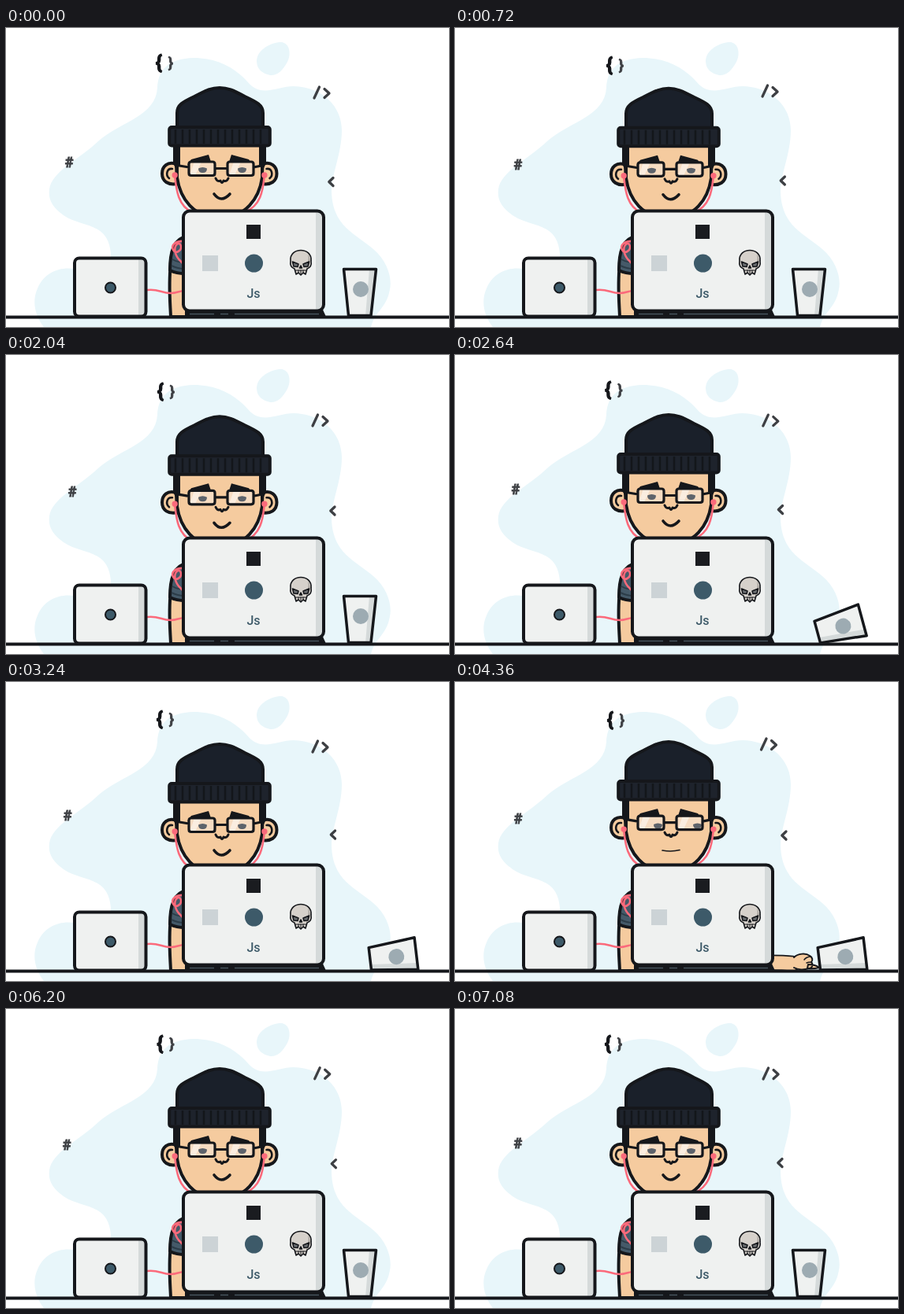
These frames come from a looping animation (562 by 380 pixels, 7120 ms). An HTML page:

```html
<!DOCTYPE html>
<html lang="en">
<head>
<meta charset="utf-8">
<title>Coder at the desk</title>
<style>
  html, body { margin: 0; width: 100%; height: 100%; overflow: hidden; background: #fff; }
  svg { display: block; width: 562px; height: 380px; }
  .ink { stroke: #15171b; stroke-width: 4; stroke-linejoin: round; stroke-linecap: round; }
  .line { fill: none; }
  .skin { fill: #f5cb9f; }
  .shell { fill: #eff1f0; }
  .shade { fill: #d5dada; }
  .cord { fill: none; stroke: #fb6a7b; stroke-width: 2.6; stroke-linecap: round; }
  .code { font: 700 22px Roboto, Arial, sans-serif; text-anchor: middle; fill: #3d3f43; stroke: #3d3f43; stroke-width: .8; }
  .code path { fill: none; stroke-width: 3.3; stroke-linecap: round; stroke-linejoin: round; }
  #fist path { vector-effect: non-scaling-stroke; }
</style>
</head>
<body>
<svg viewBox="0 0 562 380">
  <g fill="#e8f6fa">
    <path d="M55 205C58 182 92 168 118 143C146 119 190 112 192 76C193 52 207 39 238 38C270 38 292 52 307 69C324 89 344 74 365 74C402 75 426 100 426 130C426 160 413 185 413 208C414 252 444 262 466 281C484 296 490 318 487 332C483 356 468 360 463 380H48C36 365 33 346 40 331C50 306 78 300 100 310C120 318 134 302 133 287C130 246 96 254 73 238C61 229 53 220 55 205Z"/>
    <path d="M318 42C318 28 336 18 349 18C360 19 362 33 357 43C351 54 344 61 335 60C326 58 318 53 318 42Z"/>
  </g>

  <g class="code">
    <g id="braces">
      <text dy="7" style="font-size:24px;fill:#15171b;stroke:#15171b;stroke-width:1.3">{</text>
      <text x="15" dy="6.3" style="font-size:19px">}</text>
    </g>
    <path id="tag" d="M-9 7L-2.500 -7M4 -4.500L10 1L4 6.500"/>
    <text id="hash" dy="6.400" style="font-size:18px">#</text>
    <path id="less" d="M2.500 -5L-2.700 0L2.500 5"/>
  </g>

  <!-- near arm and sleeve -->
  <path class="ink skin" d="M209 300C206 325 208 345 209 367H240V300Z"/>
  <path class="ink" fill="#455a69" d="M208 308C208 285 212 267 232 264V312Q218 313 208 308Z"/>
  <path class="line" stroke="#2c3c48" stroke-width="2" d="M210 302Q218 306 226 306M211 294Q218 298 226 298"/>
  <path class="cord" d="M227 271C215 270 209 276 212 282C215 288 223 283 222 277C220 270 212 276 215 286C218 297 224 295 227 304"/>

  <g id="head">
    <g id="ear">
      <path class="ink skin" d="M216 173C205 169 198 176 198 185C198 195 206 200 217 198Z"/>
      <path class="ink line" style="stroke-width:2.6" d="M211 179C204 178 202 187 207 191"/>
    </g>
    <use href="#ear" transform="matrix(-1 0 0 1 541.5 0)"/>
    <path class="ink skin" d="M217 145V190C221 217 238 241 271 241C304 241 321 217 325 190V145Z"/>
    <path fill="#15171b" d="M212 148H221V174L216 180L212 172ZM330 148H321V174L326 180L330 172Z"/>
    <path class="cord" d="M214 187C216 203 217 225 236 234M328 187C326 203 325 225 303 234"/>
    <path fill="#fb6a7b" d="M210.500 187a3.700 3.700 0 1 1 7.400 0a3.700 3.700 0 1 1 -7.400 0M324.200 187a3.700 3.700 0 1 1 7.400 0a3.700 3.700 0 1 1 -7.400 0"/>
    <path fill="#15171b" d="M230 174L235 167L257 161L260 170ZM313 174L308 167L286 161L283 170Z"/>
    <g fill="#f6dcc2"><rect x="232" y="170" width="33" height="17.500" rx="3"/><rect x="281" y="170" width="33" height="17.500" rx="3"/></g>
    <g id="eyes" fill="#5d636b">
      <path d="M244 178.500Q249.500 175.500 255 178.500Q255 184 249.500 184Q244 184 244 178.500ZM294 178.500Q299.500 175.500 305 178.500Q305 184 299.500 184Q294 184 294 178.500Z"/>
    </g>
    <path fill="#fff" opacity=".5" d="M239 170h9l-8 17h-7zM289 170h9l-8 17h-7z"/>
    <path class="ink line" style="stroke-width:3.200" d="M235 170H262Q265 170 265 173V184.500Q265 187.500 262 187.500H235Q232 187.500 232 184.500V173Q232 170 235 170ZM284 170H311Q314 170 314 173V184.500Q314 187.500 311 187.500H284Q281 187.500 281 184.500V173Q281 170 284 170ZM265 178.500H281M232 177L220 175M314 177L324 175"/>
    <path class="ink line" style="stroke-width:3" d="M266 191Q268 196 272 194Q274 199 276 194Q280 196 282 191"/>
    <path id="mouth" class="ink line"/>
    <path class="ink" fill="#1a202a" d="M217 128V108C217 98 224 94 239 87C254 79 261 76 271 76C281 76 288 79 303 87C318 94 326 98 326 108V128Z"/>
    <rect class="ink" x="207.200" y="126" width="127.600" height="23.500" rx="3" fill="#1e232c"/>
    <path id="ribs" class="line" stroke="#13161a" stroke-width="2.500"/>
  </g>

  <g id="arm">
    <path id="sleeve" class="ink line"/>
    <path id="forearm" class="line" stroke="#f5cb9f" stroke-width="17" stroke-linecap="round"/>
    <g id="fist">
      <path class="ink skin" style="stroke-width:2" d="M6 3Q15 3 20 7Q12 9 5 8ZM-12 -6C-7 -11 3 -12 8 -8C12 -6 12 -2 10 0C13 3 11 8 7 8C1 10 -7 10 -12 7"/>
      <path class="ink line" style="stroke-width:1.500" d="M8 -7Q3 -6 1 -3M10 0Q6 0 4 1"/>
    </g>
  </g>

  <g id="cup">
    <path class="shell" d="M428 306H470L463 366H434Z"/>
    <path class="shade" d="M461 306H470L463 366H456Z"/>
    <circle cx="450" cy="332" r="10" fill="#9dabb2"/>
    <path class="ink line" style="stroke-width:3.500" d="M428.500 306.500H469.500L463 365.500H434.500Z"/>
  </g>

  <!-- small laptop -->
  <path class="cord" d="M179 333C193 331 197 337 209 337C217 337 219 334 227 334"/>
  <rect class="shell" x="87" y="292.500" width="90.500" height="74" rx="6"/>
  <path class="shade" d="M168 294H176V365H168Z"/>
  <rect class="ink line" x="87" y="292.500" width="90.500" height="74" rx="6"/>
  <circle class="ink" cx="132.500" cy="330" r="6.500" fill="#3d5a69" style="stroke-width:2"/>

  <!-- large laptop -->
  <path fill="#15171b" d="M227 358H402L406 367H227Z"/>
  <path class="line" stroke="#46545d" stroke-width="1.500" d="M233 363.500H264M272 363.500H282M290 363.500H397"/>
  <rect class="shell" x="225" y="232.500" width="178" height="127" rx="8"/>
  <path class="shade" d="M393 234H398Q402 235 402 241V352Q402 358 398 358H393Z"/>
  <rect class="ink line" x="225" y="232.500" width="178" height="127" rx="8"/>
  <rect x="305" y="250" width="18" height="18" fill="#1a1c20"/>
  <rect x="249" y="289" width="20" height="20" fill="#ccd3d6"/>
  <circle cx="314.500" cy="299" r="11.500" fill="#3d5a69"/>
  <text x="314" y="342.500" text-anchor="middle" fill="#3d5a69" style="font:500 16px Roboto,Arial,sans-serif">Js</text>
  <g class="ink" fill="#d6d1cb" style="stroke-width:1.600">
    <path d="M361 296C359 278 389 278 387 296C388 302 385 305 382 306L380 313L377 311L374 314L371 311L368 313L366 306C363 305 360 302 361 296Z"/>
    <path fill="#aaa59f" stroke="none" d="M383 287Q388 295 384 303L380 306Q385 296 383 287Z"/>
    <path fill="#6a6d70" d="M363.500 297L371 300L370 303.500L365 303ZM384.500 297L377 300L378 303.500L383 303ZM374 302L372.500 305H375.500Z"/>
    <path class="line" d="M367 308H381M371 308V311M374 308V313M377 308V311" style="stroke-width:1"/>
  </g>

  <path stroke="#15171b" stroke-width="4" d="M0 367.500H562"/>
</svg>
<script>
const LOOP = 7120;
const el = id => document.getElementById(id);
const set = (id, name, value) => el(id).setAttribute(name, value);
const move = (id, x, y, more = '') => set(id, 'transform', `translate(${x} ${y}) ${more}`);
const mix = (a, b, k) => a + (b - a) * k;

// Drifting symbols: shared key times and one x and y track each.
const keys = [0, 760, 1440, 2040, 2800, 3240, 4360, 5320, 6480];
const drift = {
  braces: [[194, 196, 195, 196, 194, 195, 197, 197, 195], [45, 48, 51, 47, 45, 47.5, 49, 48, 44.5]],
  tag: [[400, 399, 398, 398, 400, 398, 397.5, 399, 401], [82, 80, 81, 83, 83, 82, 79, 84, 81]],
  hash: [[80, 80, 82.5, 84, 75.5, 78, 80, 85, 75.5], [171, 174, 175.5, 174, 170, 169.5, 174, 175, 172]],
  less: [[412.5, 416, 416, 414.5, 413, 415, 417.5, 414.5, 416], [195.5, 194, 197, 198, 196, 194, 195, 198.5, 196]]
};

// Smooth curve through the keys, closed over the loop.
function curve(track, t) {
  const n = keys.length;
  const time = i => keys[(i + n) % n] + Math.floor(i / n) * LOOP;
  const at = i => track[(i + n) % n];
  const slope = i => (at(i + 1) - at(i - 1)) / (time(i + 1) - time(i - 1));
  let i = n - 1;
  while (keys[i] > t) i--;
  const d = time(i + 1) - time(i), u = (t - time(i)) / d, v = 1 - u;
  return v * v * ((1 + 2 * u) * at(i) + u * d * slope(i))
    + u * u * ((3 - 2 * u) * at(i + 1) - v * d * slope(i + 1));
}

function draw(t) {
  const ramp = (a, b) => {
    const k = Math.min(1, Math.max(0, (t - a) / (b - a)));
    return k * k * (3 - 2 * k);
  };
  for (const id in drift) move(id, ...drift[id].map(track => curve(track, t)));

  const beat = (1 - Math.cos(t / LOOP * 16 * Math.PI)) / 2;
  move('head', 0, 3.3 * beat * beat * (3 - 2 * beat));

  const look = ramp(3680, 3840) - ramp(5760, 5920);
  move('eyes', 8 * look, 2.5 * look);
  const flat = t >= 3760 && t < 5840;
  set('mouth', 'd', flat ? 'M263 214Q275 216 285 213.500' : 'M264 211Q273 223 284 211');
  el('mouth').style.strokeWidth = flat ? 1.6 : 3.6;

  const lift = ramp(4640, 5260);
  set('cup', 'transform', `rotate(${83.3 * (ramp(2320, 2720) - lift)} 463 366)`);

  const reach = ramp(3700, 4340) - ramp(5400, 5760);
  const x = mix(365, mix(442, 424, lift), reach), y = mix(356, 330, lift);
  const limb = `M${x - 64} ${mix(357, 341, lift)}Q${x - 30} ${mix(356, 338, lift)} ${x - 14} ${mix(358, 333, lift)}`;
  set('sleeve', 'd', limb);
  set('forearm', 'd', limb);
  el('sleeve').style.strokeWidth = 20.5;
  move('fist', x, y, `scale(1 ${mix(1, 1.7, lift)})`);
}

let ribs = '';
for (let x = 215; x < 332; x += 9) ribs += `M${x} 129V147`;
set('ribs', 'd', ribs);

const start = performance.now();
function tick() {
  draw((performance.now() - start) % LOOP);
  requestAnimationFrame(tick);
}
tick();
</script>
</body>
</html>
```
